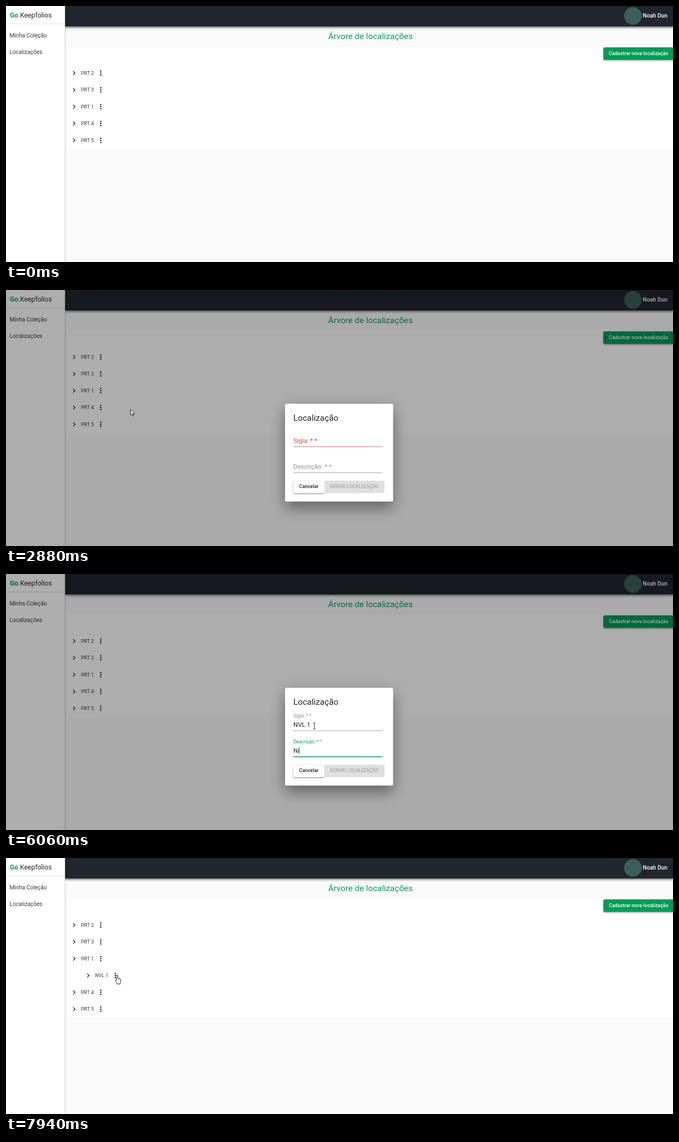
An HTML page with a canvas for the animation above (8 s loop, 1207 by 464 pixels).

```html
<!DOCTYPE html>
<html lang="pt">
<head>
<meta charset="utf-8">
<title>Árvore de localizações</title>
<style>
  html, body { margin: 0; width: 100%; height: 100%; overflow: hidden; background: #fafafa; }
  canvas { display: block; }
</style>
</head>
<body>
<canvas id="stage" width="1207" height="464"></canvas>
<script>
const ctx = document.getElementById('stage').getContext('2d');
const W = 1207, H = 464, LOOP = 8000;
const UNIT = 0.635;                       // page zoom
const SMALL = 14 * UNIT, BODY = 16 * UNIT, FIELD = 18 * UNIT, TITLE = 24 * UNIT;
const GREEN = [0, 155, 90], RED = [209, 74, 53], GREY = [140, 140, 140];
const PINK = [238, 105, 140], INK = '#3a3a3a';

const ICONS = {
  chevron: new Path2D('M10 6 8.59 7.41 13.17 12l-4.58 4.59L10 18l6-6z'),
  dots: new Path2D('M12 8a2 2 0 1 0 0-4 2 2 0 0 0 0 4zm0 2a2 2 0 1 0 0 4 2 2 0 0 0 0-4zm0 6a2 2 0 1 0 0 4 2 2 0 0 0 0-4z'),
  plus: new Path2D('M19 13h-6v6h-2v-6H5v-2h6V5h2v6h6v2z'),
  trash: new Path2D('M6 19c0 1.1.9 2 2 2h8c1.1 0 2-.9 2-2V7H6v12zM19 4h-3.5l-1-1h-5l-1 1H5v2h14V4z')
};
const CURSORS = {
  arrow: new Path2D('M.5.5V10.8L2.9 8.6 4.5 12.3 6 11.6 4.4 8H7.6Z'),
  hand: new Path2D('M-1-.1a1.1 1.1 0 0 1 2.3.4V6c0-1.1 1.9-1 1.9.3 0-1 1.7-.9 1.7.4 0-.8 1.5-.6 1.5.7V11.3c0 1.6-.9 2.3-.9 4.2H.2C0 13.4-2 11.6-3 9.6-3.5 8.5-2.2 7.7-1 9.1Z'),
  beam: new Path2D('M-2-5.5h1.4L0-5l.6-.5H2M0-5V5M-2 5.5h1.4L0 5l.6.5H2')
};

// Pointer trips: start, end, number of steps, way points
const TRIPS = [
  [220, 390, 3, [[841, 332], [520, 213], [324, 145]]],
  [540, 1150, 9, [[285, 161], [205, 192], [158, 203], [146, 202], [168, 198], [190, 192], [195, 191]]],
  [1320, 1630, 5, [[189, 190], [176, 188], [179.5, 186]]],
  [2180, 2500, 5, [[184, 189], [206, 204], [225.5, 215]]],
  [2880, 2880, 1, [[225, 216]]],
  [3420, 4070, 9, [[232, 222], [325, 250], [460, 270], [548, 274], [558, 275.5], [558, 275.5]]],
  [7070, 7310, 4, [[557, 274], [450, 256], [325, 238], [237, 226]]],
  [7550, 7940, 6, [[230, 223], [211, 215], [201, 212]]]
];
const SIGLA = [[4870, 'NVL'], [5590, 'NVL '], [5740, 'NVL 1']];
const DESCR = [[6060, 'Ní'], [6210, 'Nív'], [6290, 'Níve'], [6370, 'Nível'], [6530, 'Nível '], [6690, 'Nível 1']];

const rgb = c => `rgb(${c.map(Math.round).join(',')})`;
const mix = (a, b, u) => a.map((v, i) => v + (b[i] - v) * u);
const between = (t, a, b) => t >= a && t < b;

function typed(list, t) {
  let s = '';
  for (const [at, value] of list) if (t >= at) s = value;
  return s;
}

function pointerAt(t) {
  const trip = TRIPS.filter(m => t >= m[0]).pop();
  if (!trip) return null;
  const [from, to, n, pts] = trip;
  const gap = n > 1 ? (to - from) / (n - 1) : 1;
  const step = Math.min(n - 1, Math.floor((t - from) / gap + 0.01));
  const pos = n > 1 ? step / (n - 1) * (pts.length - 1) : 0;
  const i = Math.floor(pos);
  return mix(pts[i], pts[Math.min(i + 1, pts.length - 1)], pos - i);
}

function text(s, x, y, size, color = INK, weight = 400, align = 'left') {
  ctx.font = `${weight} ${size}px Roboto, sans-serif`;
  ctx.textAlign = align;
  ctx.fillStyle = color;
  ctx.fillText(s, x, y + size * 0.355);    // y is the middle of the capitals
  return ctx.measureText(s).width;
}

function rect(x, y, w, h, color) {
  ctx.fillStyle = color;
  ctx.fillRect(x, y, w, h);
}

function disc(x, y, r, color) {
  ctx.fillStyle = color;
  ctx.beginPath();
  ctx.arc(x, y, r, 0, Math.PI * 2);
  ctx.fill();
}

function card(x, y, w, h, color, blur = 0, drop = 0, alpha = 0.4, radii = 2.5) {
  ctx.save();
  ctx.shadowColor = `rgba(0,0,0,${alpha})`;
  ctx.shadowBlur = blur;
  ctx.shadowOffsetY = drop;
  ctx.fillStyle = color;
  ctx.beginPath();
  ctx.roundRect(x, y, w, h, radii);
  ctx.fill();
  ctx.restore();
}

function icon(name, x, y, color = '#1c1c1c') {
  ctx.save();
  ctx.translate(x, y);
  ctx.scale(UNIT, UNIT);
  ctx.translate(-12, -12);
  ctx.fillStyle = color;
  ctx.fill(ICONS[name]);
  ctx.restore();
}

function treeRows(t) {
  const rows = ['PRT 2', 'PRT 3', 'PRT 1', 'PRT 4', 'PRT 5'].map(name => ({ name, indent: 0 }));
  if (t >= 7310) rows.splice(3, 0, { name: 'NVL 1', indent: 25.5 });
  rows.forEach((r, i) => {
    r.y = 121.5 + i * 30.5;
    r.dots = 171.5 + r.indent + (r.indent ? 0.8 : 0);
  });
  return rows;
}

function drawProgress(t, y) {
  const k = Math.floor((t - 7070) / 80);
  const [a, b] = [[183, 645.5], [183, 720], [245, 790]][Math.min(k, 2)];
  rect(183, y - 1.2, W - 183, 2.5, '#b9ddd0');
  rect(a, y - 1.2, b - a, 2.5, rgb(GREEN));
}

function drawPage(t, rows) {
  rect(0, 0, W, H, '#fafafa');
  rect(110, 74, W - 110, rows.length * 30.5 + 32.5, '#fff');
  text('Árvore de localizações', 659.5, 54.5, TITLE, '#109a60', 400, 'center');
  card(1081, 75, 130, 22.5, rgb(GREEN), 3, 1.2, 0.45);
  text('Cadastrar nova localização', 1144.7, 86.2, SMALL, '#fff', 500, 'center');

  const loading = between(t, 7070, 7310);
  for (const r of rows) {
    icon('chevron', 123.2 + r.indent, r.y);
    if (loading && r.name === 'PRT 1') {
      text('PRT', 136, r.y - 6.3, SMALL);
      text('1', 136, r.y + 6.3, SMALL);
      icon('dots', 170, r.y);
      drawProgress(t, r.y);
    } else {
      text(r.name, 135.7 + r.indent, r.y, SMALL);
      icon('dots', r.dots, r.y);
    }
  }

  card(107, 0, W - 107, 37, '#20252e', 4, 1.5, 0.6, 0);
  disc(1134.5, 18, 16, '#3c5f57');
  text('Noah Dun', 1152.3, 17.6, BODY, '#fff', 500);

  card(0, -5, 106.6, H + 10, '#fff', 2, 0, 0.35, 0);
  rect(0, 32, 106.6, 1, '#e2e2e2');
  const w = text('Go', 7, 16.3, 12.19, '#109a60', 700);
  text('.Keepfolios', 7 + w, 16.3, 12.19, '#2b2b2b');
  text('Minha Coleção', 6.5, 53, BODY);
  text('Localizações', 6.5, 83.5, BODY);
}

function drawMenu() {
  card(158.5, 195.5, 86.3, 71.3, '#fff', 5, 1.6, 0.5);
  rect(158.5, 200.5, 86.3, 30.5, '#dadada');
  icon('plus', 176.7, 215.7, '#6b6b6b');
  icon('trash', 176.7, 246, '#6b6b6b');
  text('Adicionar', 196.5, 215.7, SMALL);
  text('Deletar', 196.5, 246, SMALL);
}

// lift: 0 label rests in the field, 1 label floats above it
function drawField(label, y, value, lift, color, star, focused, caret) {
  const size = FIELD * (1 - 0.25 * lift);
  const ly = y - 16.3 * lift;
  const w = text(label + ' * ', 520, ly, size, rgb(color));
  text('*', 520 + w, ly, size, rgb(star));
  rect(520, y + 10.6, 161, focused ? 1.5 : 0.8, rgb(color));
  const end = text(value, 520, y, FIELD, '#222');
  if (caret) rect(Math.floor(520 + end), y - 6.5, 1, 13, rgb(color));
}

function drawDialog(t) {
  rect(0, 0, W, H, 'rgba(0,0,0,.32)');
  card(505, 206.5, 195.3, 176.7, '#fff', 29, 6, 0.2);
  card(505, 206.5, 195.3, 176.7, '#fff', 24, 15, 0.25);
  text('Localização', 520, 231.5, TITLE, '#222');

  const second = t >= 6060;
  const lift = t < 3990 ? 0 : t < 4070 ? 0.5 : 1;
  const ok = t < 5180 ? 0 : t < 5270 ? 0.5 : 1;
  const color = second ? GREY : mix(RED, GREEN, ok);
  const star = second ? GREY : mix(RED, PINK, ok);
  const caret = between(t, 4070, 4550) || between(t, 5180, 6060);
  drawField('Sigla:', 273, typed(SIGLA, t), lift, color, star, lift > 0 && !second, caret);
  drawField('Descrição:', 320, typed(DESCR, t), second ? 1 : 0,
    second ? GREEN : GREY, second ? [190, 130, 145] : GREY, second, second);

  const on = t < 6210 ? 0 : t < 6290 ? 0.35 : t < 6370 ? 0.7 : 1;
  card(520, 345.5, 56, 22.5, '#fff', 3, 1.2, 0.45);
  text('Cancelar', 548, 356.3, SMALL, '#222', 500, 'center');
  card(576, 345.5, 109, 22.5, rgb(mix([223, 223, 223], GREEN, on)), 3, 1.2, 0.45 * on);
  text('GERAR LOCALIZAÇÃO', 630.3, 356.3, SMALL,
    rgb(mix([168, 168, 168], [255, 255, 255], on)), 500, 'center');
}

function pointerKind(x, y, rows, menu, dialog) {
  if (dialog) return x > 520 && x < 681 && y > 262 && y < 285 ? 'beam' : 'arrow';
  if (menu && x > 158 && x < 245 && y > 186 && y < 262) return 'hand';
  return rows.some(r => Math.hypot(x - r.dots, y - r.y) < 12.7) ? 'hand' : 'arrow';
}

function drawPointer(x, y, kind) {
  ctx.save();
  ctx.translate(x, kind === 'hand' ? y + 0.9 : y);
  ctx.lineWidth = 0.9;
  ctx.lineJoin = 'round';
  ctx.strokeStyle = '#111';
  ctx.fillStyle = '#fff';
  if (kind !== 'beam') ctx.fill(CURSORS[kind]);
  ctx.stroke(CURSORS[kind]);
  ctx.restore();
}

function draw(t) {
  const rows = treeRows(t);
  const menu = between(t, 2040, 2880);
  const dialog = between(t, 2880, 7070);
  drawPage(t, rows);
  if (between(t, 1950, 2040)) disc(171.5, 182.5, 12.7, 'rgba(0,0,0,.1)');
  if (menu) drawMenu();
  if (dialog) drawDialog(t);

  const p = pointerAt(t);
  if (!p) return;
  const click = between(t, 1950, 2040) || between(t, 2800, 2880) || between(t, 3988, 4070);
  if (click) disc(p[0], p[1] + 1.5, 9, 'rgba(232,218,40,.75)');
  drawPointer(p[0], p[1], pointerKind(p[0], p[1], rows, menu, dialog));
}

const start = performance.now();
function tick() {
  draw((performance.now() - start) % LOOP);
  requestAnimationFrame(tick);
}
tick();
</script>
</body>
</html>
```
